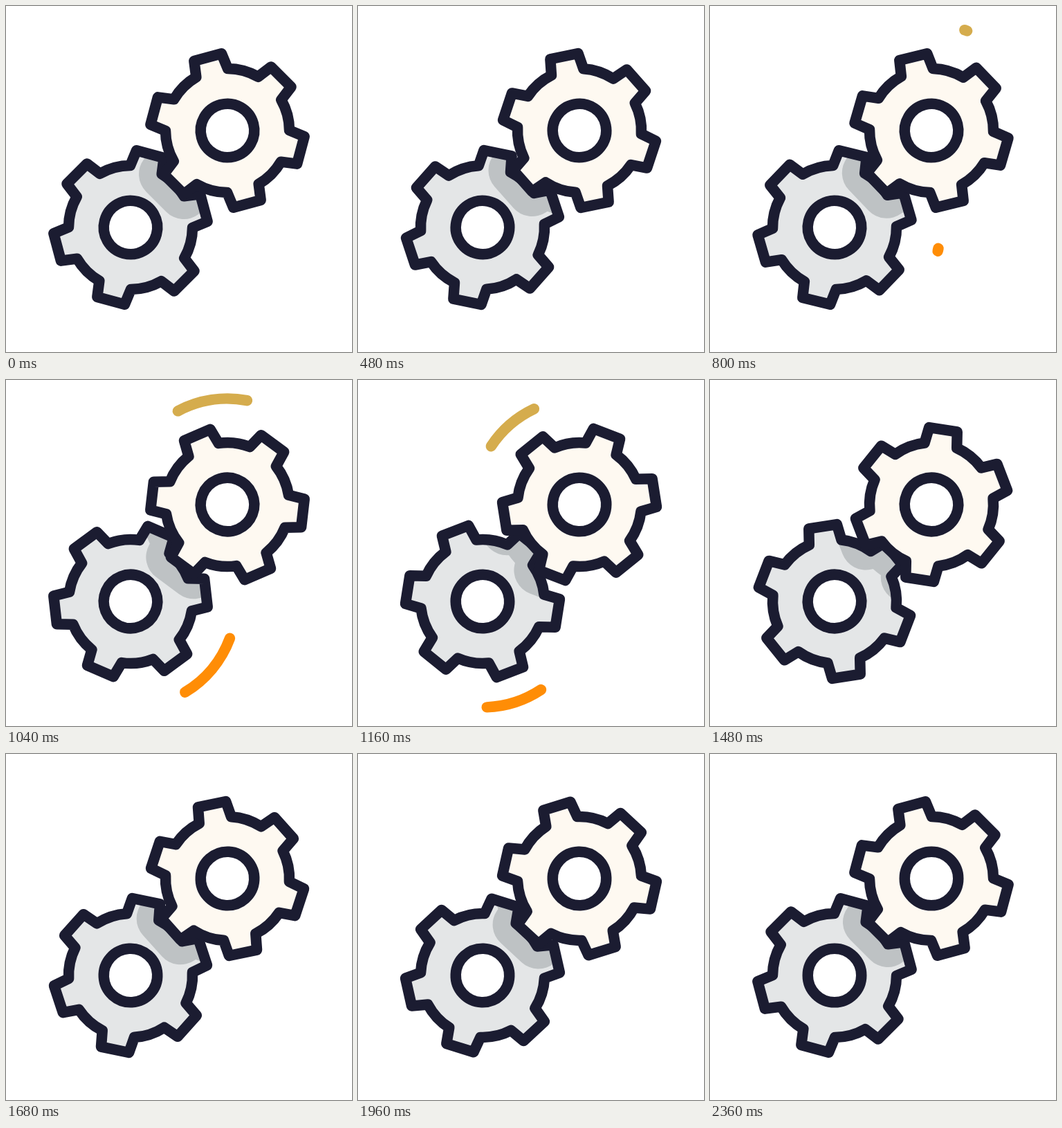
An HTML page with a canvas for the animation above (2520 ms loop, 500 by 500 pixels).

```html
<!DOCTYPE html>
<html lang="en">
<head>
<meta charset="utf-8">
<title>Gears</title>
<style>
  html, body { margin: 0; width: 100%; height: 100%; overflow: hidden; background: #fff; }
  canvas { display: block; }
</style>
</head>
<body>
<canvas width="500" height="500"></canvas>
<script>
const ctx = document.querySelector('canvas').getContext('2d');
const LOOP = 2520, STEP = 40, MID = 1320, LINE = 15.5;
const INK = '#1b1c31', CREAM = '#fef9f1', GREY = '#e4e6e7', SHADE = '#bec2c4';
const GOLD = '#d5ac4d', ORANGE = '#ff8d06';
const rad = deg => deg * Math.PI / 180;

// Six-toothed wheel around the origin, one tooth pointing up.
function gearPath() {
  const path = new Path2D();
  const tip = deg => path.lineTo(111.5 * Math.cos(rad(deg)), 111.5 * Math.sin(rad(deg)));
  for (let a = -90; a < 270; a += 60) {
    tip(a - 10.6);
    tip(a + 10.6);
    path.arc(0, 0, 89.5, rad(a + 15.3), rad(a + 44.7));
  }
  path.closePath();
  return path;
}
const gear = gearPath();
const hole = new Path2D();
hole.arc(0, 0, 38.75, 0, 2 * Math.PI);

// Half of the turn, measured from its midpoint: [ms, degrees, degrees per ms].
const turnKeys = [
  [0, 0, 0.24], [160, 36.1, 0.18], [280, 51.5, 0.085],
  [640, 62.3, 0.012], [840, 63.4, -0.005], [1040, 60, -0.025]
];

function turn(time) {
  const side = Math.sign(time - MID);
  const x = Math.min(Math.abs(time - MID), 1040);
  const i = Math.max(1, turnKeys.findIndex(k => x <= k[0]));
  const [x0, y0, m0] = turnKeys[i - 1], [x1, y1, m1] = turnKeys[i];
  const d = x1 - x0, u = (x - x0) / d, v = 1 - u;
  const y = v * v * ((1 + 2 * u) * y0 + u * d * m0)
          + u * u * ((1 + 2 * v) * y1 - v * d * m1);
  return 60 + side * y;
}

function at(x, y, deg, draw) {
  ctx.save();
  ctx.translate(x, y);
  ctx.rotate(rad(deg));
  draw();
  ctx.restore();
}

function stroke(path, color, width) {
  ctx.strokeStyle = color;
  ctx.lineWidth = width;
  ctx.stroke(path);
}

function fill(path, color) {
  ctx.fillStyle = color;
  ctx.fill(path);
}

function outline() {
  fill(hole, '#fff');
  stroke(gear, INK, LINE);
  stroke(hole, INK, LINE);
}

function ease(time, start, end) {
  const u = Math.min(1, Math.max(0, (time - start) / (end - start)));
  return u * u * (3 - 2 * u);
}

// Arc between two bearings measured clockwise from up.
function swoosh(x, y, from, to, color) {
  const path = new Path2D();
  path.arc(x, y, 153, rad(from - 90), rad(to - 90));
  stroke(path, color, LINE);
}

function render(time) {
  const angle = -15 - turn(time);
  ctx.clearRect(0, 0, 500, 500);
  ctx.lineJoin = ctx.lineCap = 'round';

  if (time > 760 && time < 1380) {
    const lead = 19.6 - 95 * ease(time, 760, 1320);
    const tail = 19.6 - 95 * ease(time, 962, 1372);
    swoosh(320, 180, lead, tail + 0.1, GOLD);
    swoosh(180, 320, 121 - tail, 121.1 - lead, ORANGE);
  }

  ctx.save();
  at(180, 320, -angle, () => fill(gear, GREY));
  // The upper wheel casts a widened shadow on the lower one.
  const clip = new Path2D();
  clip.addPath(gear, new DOMMatrix().translate(180, 320).rotate(-angle));
  ctx.clip(clip);
  at(320, 180, angle, () => {
    fill(gear, SHADE);
    stroke(gear, SHADE, 72);
  });
  ctx.restore();
  at(180, 320, -angle, outline);

  at(320, 180, angle, () => {
    fill(gear, CREAM);
    outline();
  });
}

const begin = performance.now();
function tick() {
  const time = (performance.now() - begin) % LOOP;
  render(Math.floor(time / STEP) * STEP);
  requestAnimationFrame(tick);
}
tick();
</script>
</body>
</html>
```
